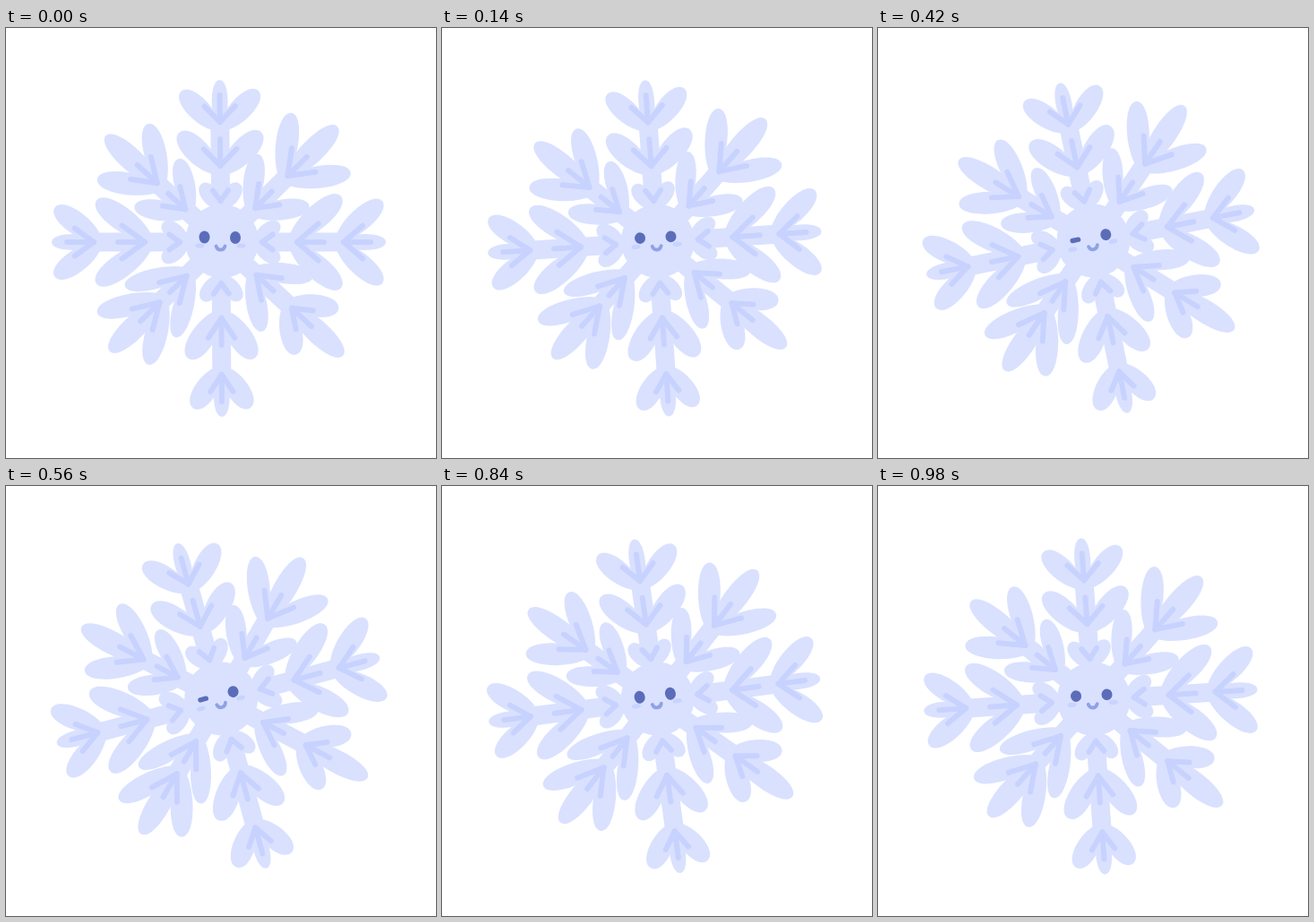
Animation, 480 px wide and 480 px high, one loop 1.12 s. Source, as an HTML page:

```html
<!DOCTYPE html>
<html lang="en">
<head>
<meta charset="utf-8">
<title>Snowflake</title>
<style>
  html, body { margin: 0; width: 100%; height: 100%; overflow: hidden; background: #fff; }
  svg { display: block; width: 100vw; height: 100vh; }
  .ice { fill: #d9e1ff; }
  .stem { stroke: #d9e1ff; stroke-width: 21; stroke-linecap: round; }
  .vein { fill: none; stroke: #c8d2fe; stroke-width: 6; stroke-linecap: round; stroke-linejoin: round; }
  .eye { fill: #5b6db9; }
  .blush { fill: #c8d3ff; }
  .mouth { fill: none; stroke: #8fa2e6; stroke-width: 3.8; stroke-linecap: round; }
</style>
</head>
<body>
<svg viewBox="0 0 480 480">
  <g id="flake">
    <circle class="ice" cx="241" cy="238" r="41"/>
    <g id="arms"></g>
    <g id="veins"></g>
    <ellipse class="blush" cx="216.5" cy="243" rx="5" ry="2.6"/>
    <ellipse class="blush" cx="262.5" cy="243" rx="5" ry="2.6"/>
    <rect class="eye" id="leftEye"/>
    <rect class="eye" id="rightEye"/>
    <path class="mouth" d="M234.500 243.500 C236 249 243 249 244.500 243.500"/>
  </g>
</svg>
<script>
const $ = id => document.getElementById(id);

function setAttrs(el, attrs) {
  for (const key in attrs) el.setAttribute(key, attrs[key]);
}

function add(parent, tag, attrs) {
  const el = document.createElementNS("http://www.w3.org/2000/svg", tag);
  setAttrs(el, attrs);
  parent.append(el);
  return el;
}

// Each arm is built along the x axis, then turned into place.
// tip and mid are the lengths of the side leaves in the two main tufts.
const arms = [
  { angle: -90.5, reach: 181, spread: 44, tip: 62, mid: 66 },
  { angle: -44.8, reach: 183, spread: 37, tip: 78, mid: 68, diagonal: true },
  { angle: 0, reach: 184, spread: 41, tip: 70, mid: 78 },
  { angle: 43, reach: 186, spread: 36, tip: 60, mid: 71, diagonal: true },
  { angle: 89.7, reach: 195, spread: 34, tip: 57, mid: 66 },
  { angle: 135.5, reach: 174, spread: 31, tip: 79, mid: 78, diagonal: true },
  { angle: 180, reach: 189, spread: 36, tip: 66, mid: 79 },
  { angle: 222.7, reach: 175, spread: 34, tip: 75, mid: 65, diagonal: true }
];

function leaf(group, base, turn, length, half) {
  const side = s => `${length} ${s * 1.3 * half}`;
  const root = s => `${length * 0.24} ${s * 1.35 * half}`;
  add(group, "path", {
    class: "ice",
    d: `M0 0 C${root(-1)} ${side(-1)} ${length} 0 C${side(1)} ${root(1)} 0 0Z`,
    transform: `translate(${base} 0) rotate(${turn})`
  });
}

function vein(group, base, turn, length) {
  add(group, "path", {
    class: "vein",
    d: `M0 0 H${length}`,
    transform: `translate(${base + 10} 0) rotate(${turn})`
  });
}

// A pair of leaves with a chevron of veins; middle is the length of the centre vein
function tuft(shape, lines, base, spread, length, half, middle) {
  for (const turn of [-spread, spread]) {
    leaf(shape, base, turn, length, half);
    vein(lines, base, turn, length * 0.4);
  }
  if (middle) vein(lines, base, 0, middle);
}

function drawArm({ angle, reach, spread, tip, mid, diagonal }) {
  const transform = `translate(240 239) rotate(${angle})`;
  const shape = add($("arms"), "g", { transform });
  const lines = add($("veins"), "g", { transform });
  const centre = diagonal ? 88 : 57;
  const end = reach - centre;

  add(shape, "line", { class: "stem", x1: 30, y1: 0, x2: end + 6, y2: 0 });
  leaf(shape, end, 0, centre, diagonal ? 13 : 9);
  tuft(shape, lines, end, spread, tip, 12.5, 30);
  if (diagonal) {
    tuft(shape, lines, 44, spread, mid, 11.5, 26);
  } else {
    tuft(shape, lines, 75, spread, mid, 13.5, 30);
    tuft(shape, lines, 36, 36, 36, 9.5, 0);
  }
}

arms.forEach(drawArm);

const step = 140;
const swing = 4;
const eyeWidth = 12;

function setEye(eye, cx, cy, half) {
  setAttrs(eye, {
    x: cx - eyeWidth / 2, y: cy - half, width: eyeWidth, height: half * 2,
    rx: Math.min(eyeWidth / 2, half), ry: half
  });
}

// pose counts up to the end of the swing and back; the wink holds for the far part
function setPose(pose) {
  const wink = pose >= 3;
  const open = pose % 2 ? 6.3 : 7;
  $("flake").setAttribute("transform", `rotate(${-3.75 * pose} 238 241)`);
  setEye($("leftEye"), 221.5, 233.5, wink ? 2.7 : open);
  setEye($("rightEye"), 256, 234, wink ? 6.4 : open);
}

const start = performance.now();
function tick() {
  const time = Math.max(0, performance.now() - start);
  const beat = Math.floor(time / step) % (2 * swing);
  setPose(swing - Math.abs(swing - beat));
  requestAnimationFrame(tick);
}
tick();
</script>
</body>
</html>
```
